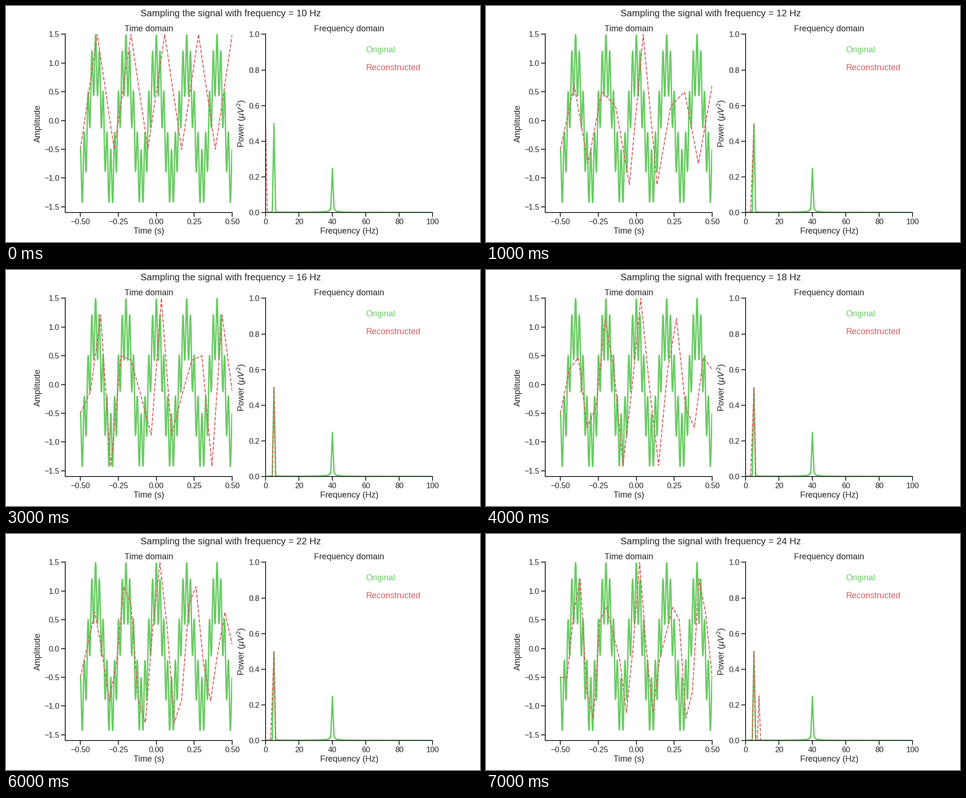
Animation of 1008x504 px, one loop 8 s. Source, as a matplotlib script:

```python
import numpy as np
import matplotlib.pyplot as plt
from matplotlib.animation import FuncAnimation

INK, GREEN, RED = "0.15", "#6ACC64", "#D65F5F"
RATES = range(10, 26, 2)

plt.rcParams.update({
    "font.family": "Liberation Sans",
    "mathtext.fontset": "dejavusans",
    "text.color": INK, "axes.labelcolor": INK, "axes.edgecolor": INK,
    "xtick.color": INK, "ytick.color": INK,
    "axes.titlesize": 18, "axes.labelsize": 18,
    "xtick.labelsize": 16.5, "ytick.labelsize": 16.5,
    "axes.linewidth": 1.875,
    "xtick.major.width": 1.875, "ytick.major.width": 1.875,
    "xtick.major.size": 9, "ytick.major.size": 9,
    "axes.spines.top": False, "axes.spines.right": False,
    "lines.solid_capstyle": "round",
})


def signal(t):
    return np.cos(2 * np.pi * 5 * t) + 0.5 * np.cos(2 * np.pi * 40 * t)


def spectrum(samples):
    n = len(samples)
    return np.arange(n // 2), np.abs(np.fft.fft(samples))[:n // 2] / n


def style_axes(ax, title, xlabel, ylabel, xlim, ylim, xticks, yticks):
    ax.set(title=title, xlabel=xlabel, ylabel=ylabel,
           xticks=xticks, yticks=yticks, xlim=xlim, ylim=ylim)


fig, (time_ax, freq_ax) = plt.subplots(1, 2, figsize=(14, 7), dpi=72)
fig.subplots_adjust(left=0.125, right=0.9, bottom=0.125, top=0.88, wspace=0.2)

style_axes(time_ax, "Time domain", "Time (s)", "Amplitude",
           (-0.6, 0.5), (-1.6, 1.5),
           np.linspace(-0.5, 0.5, 5), np.linspace(-1.5, 1.5, 7))
style_axes(freq_ax, "Frequency domain", "Frequency (Hz)", r"Power ($\mu V^2$)",
           (0, 100), (0, 1),
           np.arange(0, 101, 20), np.linspace(0, 1, 6))

t = np.linspace(-0.5, 0.5, 500)
time_ax.plot(t, signal(t), color=GREEN, lw=3)
freq_ax.plot(*spectrum(signal(t)), color=GREEN, lw=3)
sampled_line, = time_ax.plot([], [], "--", color=RED, lw=2)
sampled_power, = freq_ax.plot([], [], "--", color=RED, lw=2)

freq_ax.text(60, 0.9, "Original", color=GREEN, size=18)
freq_ax.text(60, 0.8, "Reconstructed", color=RED, size=18)
heading = freq_ax.text(-75, 1.1, "", size=20)


def update(i):
    rate = RATES[i]
    samples = signal(-0.5 + np.arange(rate) / rate)
    # The samples are spread over the whole window, end point included.
    sampled_line.set_data(np.linspace(-0.5, 0.5, rate), samples)
    sampled_power.set_data(*spectrum(samples))
    heading.set_text(f"Sampling the signal with frequency = {rate} Hz")
    return sampled_line, sampled_power, heading


anim = FuncAnimation(fig, update, frames=len(RATES), interval=1000,
                     repeat=True, repeat_delay=0)
plt.show()
```
